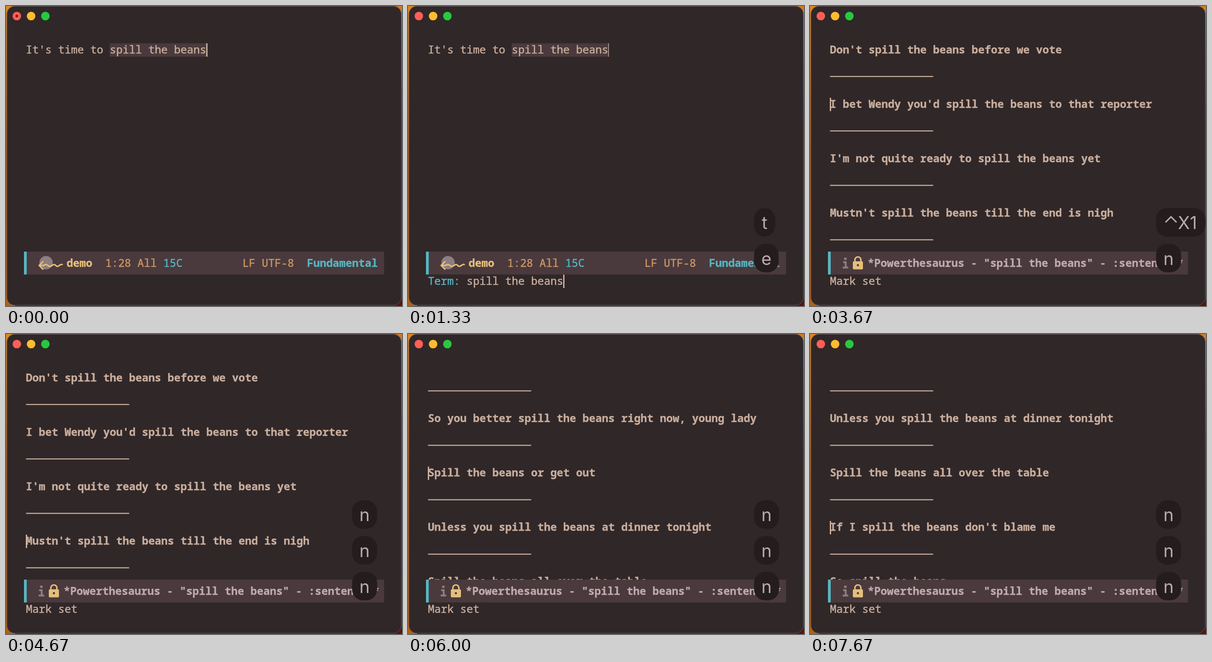
Write an HTML page that moves like this. It is 860 px wide and 651 px high and loops after 8 s.

```html
<!DOCTYPE html>
<html lang="en">
<head>
<meta charset="utf-8">
<title>Editor session</title>
<style>
  html, body { margin: 0; width: 100%; height: 100%; overflow: hidden; background: #302728; }
  svg { display: block; }
  text { white-space: pre; font: 500 23.333px "Noto Sans Mono", "DejaVu Sans Mono", monospace; stroke-width: .5; }
  text.b { font-weight: 700; stroke-width: .35; }
  text.key { font: 400 38px Inter, Roboto, sans-serif; stroke-width: 0; }
</style>
</head>
<body>
<svg width="860" height="651" viewBox="0 0 860 651">
  <defs>
    <linearGradient id="deskL" x1="0" y1="0" x2="0" y2="1">
      <stop offset="0" stop-color="#dc861f"/><stop offset=".5" stop-color="#a85312"/><stop offset="1" stop-color="#b4600f"/>
    </linearGradient>
    <linearGradient id="deskR" x1="0" y1="0" x2="0" y2="1">
      <stop offset="0" stop-color="#d67a1c"/><stop offset=".4" stop-color="#4a2c1a"/><stop offset="1" stop-color="#5a120c"/>
    </linearGradient>
    <clipPath id="page"><rect x="39" y="78" width="821" height="455"/></clipPath>
  </defs>
  <rect width="860" height="651" fill="#35160f"/>
  <rect width="20" height="651" fill="url(#deskL)"/>
  <rect x="840" width="20" height="651" fill="url(#deskR)"/>
  <rect x="2" y=".5" width="856.5" height="648.8" rx="17" fill="#302728" stroke="#695c5d"/>
  <circle cx="23.5" cy="21.8" r="9.3" fill="#ff5f57"/>
  <circle cx="54.5" cy="21.8" r="9.3" fill="#febc2e"/>
  <circle cx="85.5" cy="21.8" r="9.3" fill="#28c840"/>
  <g id="view"></g>
</svg>
<script>
const LOOP = 8000, X0 = 43.2, CHAR = 14, ROW = 29.53;
const FG = '#c9ae9d', BAR = '#4a3a3d', TEAL = '#57b5c0', GOLD = '#e5bf7b',
      AMBER = '#cc9565', TAN = '#a88463', LILAC = '#bfaaae', GREY = '#8d7e81';

const PHRASE = 'spill the beans';
const SENTENCES = [
  "Don't spill the beans before we vote",
  "I bet Wendy you'd spill the beans to that reporter",
  "I'm not quite ready to spill the beans yet",
  "Mustn't spill the beans till the end is nigh",
  'So that she can spill the beans inside the department?',
  'So you better spill the beans right now, young lady',
  'Spill the beans or get out',
  'Unless you spill the beans at dinner tonight',
  'Spill the beans all over the table',
  "If I spill the beans don't blame me",
  'So spill the beans'
];

// [label, pressed, dimmed, gone]
const KEYS = [
  ['t', 330, 1670, 2000], ['e', 1330, 2670, 3000],
  ['^M', 2000, 3330, 3670], ['^X1', 3000, 4330, 4670],
  ['n', 3670, 5000, 5330], ['n', 4330, 5670, 5670], ['n', 4670, 6000, 6000],
  ['n', 5000, 6330, 6670], ['n', 5670, 7000, 7000], ['n', 6000, 7330, 7670],
  ['n', 6670, 8000, 8000], ['n', 7000, 8000, 8000], ['n', 7670, 8000, 8000]
];
const KEY_WIDTH = { t: 46, e: 53.5, n: 54.5, '^M': 98, '^X1': 107 };

// [time, value]: the last entry reached applies
const SCROLL = [[2330, -9], [3000, 0], [5000, 9], [6000, 17], [7000, 25]];
const POINT = [[2330, 0], [3670, 1], [4330, 2], [4670, 3], [5000, 4],
               [5670, 5], [6000, 6], [6670, 7], [7000, 8], [7670, 9]];
const at = (steps, t) => steps.filter(s => s[0] <= t).pop()[1];

const rect = (x, y, w, h, fill, rx = 0) =>
  `<rect x="${x}" y="${y}" width="${w}" height="${h}" rx="${rx}" fill="${fill}"/>`;
const text = (x, y, str, fill = FG, cls = '') =>
  `<text class="${cls}" x="${x}" y="${y}" fill="${fill}" stroke="${fill}">${str}</text>`;
const line = (d, color, w) =>
  `<path d="${d}" fill="none" stroke="${color}" stroke-width="${w}"/>`;
const cursor = (x, y, w = 2.8) => rect(x, y, w, 29, '#d0b5a3');

function barBase(y, active) {
  return rect(39, y, 782, 49.6, active ? BAR : '#3e2e31') + rect(39, y, 6, 49.6, active ? TEAL : TAN);
}

function demoBar(y, active) {
  const tint = c => active ? c : TAN, base = y + 32.5;
  return barBase(y, active) +
    `<circle cx="87" cy="${y + 24}" r="14.5" fill="${tint(GREY)}"/>` +
    line(`M81 ${y + 21}L72 ${y + 30}L81 ${y + 39}M72 ${y + 30}H82q5 -4 9 0t9 0t8 0t8 0t7 -1`, tint(GOLD), 3) +
    text(131.5, base, 'demo', tint(GOLD), 'b') +
    text(215.6, base, '1:28 All', tint(AMBER)) +
    (active ? text(341.6, base, '15C', TEAL) : '') +
    text(513.5, base, 'LF UTF-8', tint(AMBER)) +
    text(653.5, base, 'Fundamental', tint(TEAL), 'b');
}

function resultBar() {
  return barBase(533, true) +
    rect(74, 546, 5.5, 5, GREY, 1) +
    line('M72 556H77.5V567M71 567.5H83', GREY, 4) +
    line('M97.5 555V551a6.5 6.5 0 0 1 13 0V555', GOLD, 3.2) +
    rect(93, 554, 22, 17.5, GOLD, 2.5) +
    '<circle cx="104" cy="562.5" r="2.4" fill="#4a3a3d"/>' +
    text(125.2, 565.5, `*Powerthesaurus - "${PHRASE}" - :sentences*`, LILAC, 'b');
}

function demoText(t) {
  const selected = t < 2330;
  const prompting = t >= 1330 && t < 2000;
  return (selected ? rect(225, 81, 210.5, 29, BAR) : '') +
    text(X0, 102.5, "It's time to " + PHRASE) +
    cursor(434.8, 81, selected && !prompting ? 2.8 : 1.4);
}

function results(t) {
  const top = at(SCROLL, t), point = at(POINT, t);
  let out = '';
  SENTENCES.forEach((s, i) => {
    const row = 4 * i - top;
    if (row >= 0 && row < 16) out += text(X0, 102.5 + row * ROW, s, FG, 'b');
    if (row >= -2 && row < 14) out += rect(43.5, 151.8 + row * ROW, 16 * CHAR, 2.3, FG);
  });
  out += cursor(43, 81 + (4 * point - top) * ROW);
  return `<g clip-path="url(#page)">${out}</g>`;
}

function pill(label, slot, dim) {
  const y = 516 - 77.6 * slot, w = KEY_WIDTH[label];
  const ctrl = label[0] === '^', ink = '#b9abad';
  const glyphs = ctrl
    ? line(`M772 ${y + 31}L784 ${y + 19}L796 ${y + 31}`, ink, 3) +
      text(799, y + 45.5, label.slice(1), ink, 'key')
    : `<text class="key" x="${751.5 + w / 2}" y="${y + 45.5}" text-anchor="middle" fill="${ink}">${label}</text>`;
  return `<g opacity="${dim ? .65 : 1}">${rect(751.5, y, w, 62, '#251c1e', 24)}${glyphs}</g>`;
}

function keys(t) {
  return KEYS.filter(k => k[1] <= t && t < k[3]).reverse()
    .map((k, slot) => pill(k[0], slot, t >= k[2])).join('');
}

function scene(t) {
  let out = t < 330 ? '<circle cx="23.5" cy="21.8" r="3" fill="#8c1512"/>' : '';
  if (t < 3000) out += demoText(t);
  if (t >= 2330) out += results(t) + resultBar();
  if (t < 2330) out += demoBar(533, true);
  else if (t < 3000) out += demoBar(297, false);
  if (t >= 1330 && t < 2000)
    out += text(X0, 604.5, 'Term:', TEAL) + text(127.2, 604.5, PHRASE) + cursor(337, 583);
  if (t >= 3670) out += text(X0, 604.5, 'Mark set');
  return out + keys(t);
}

const view = document.getElementById('view');
let shown = '', start;
function draw(now) {
  start ??= now;
  const next = scene(Math.max(0, now - start) % LOOP);
  if (next !== shown) view.innerHTML = shown = next;
  requestAnimationFrame(draw);
}
draw(performance.now());
</script>
</body>
</html>
```
